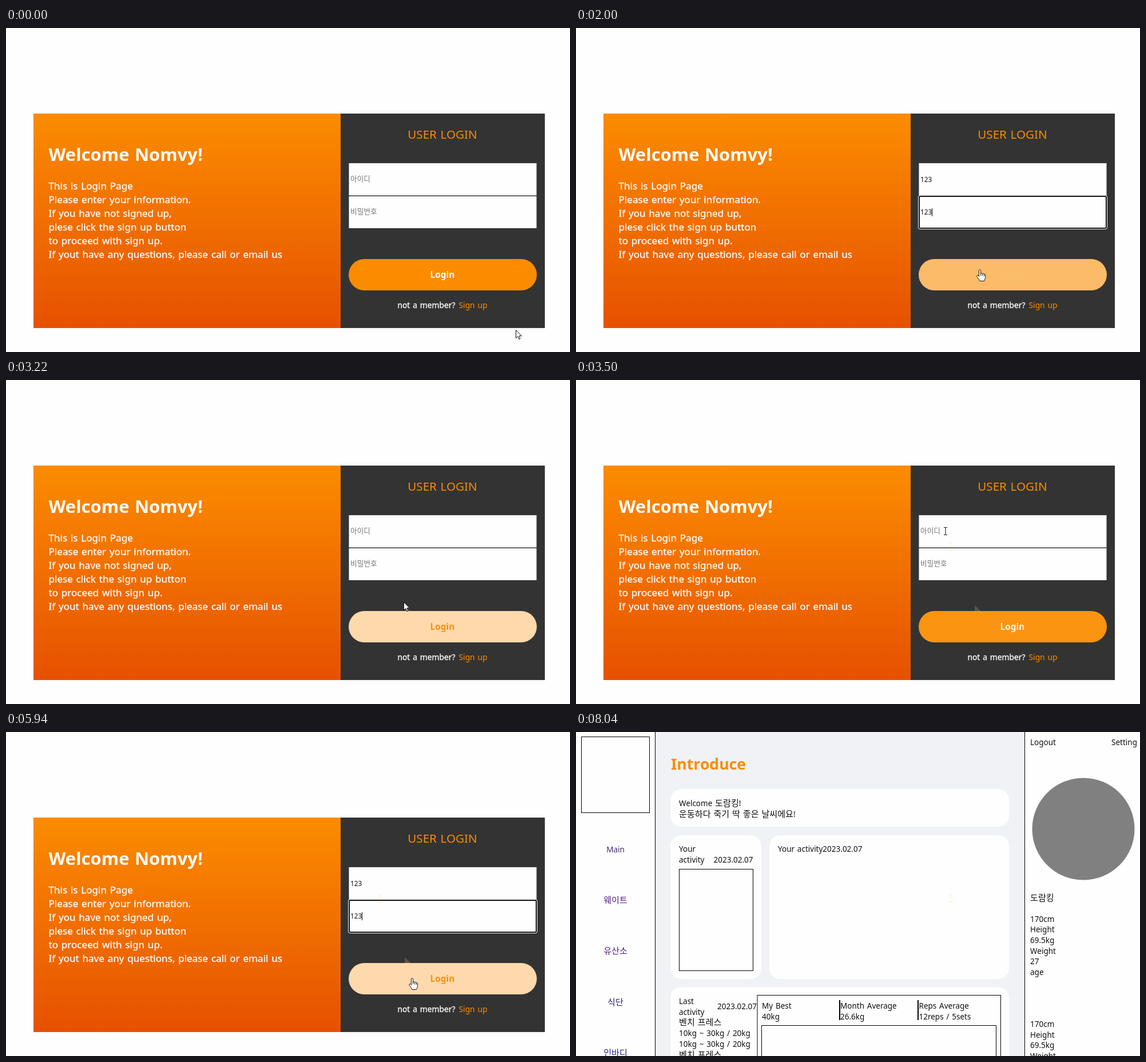
An HTML page that plays this animation: 986x568 px, repeating every 8.77 s.

```html
<!DOCTYPE html>
<html lang="ko">
<head>
<meta charset="utf-8">
<title>Login</title>
<style>
  html, body { margin: 0; width: 100%; height: 100%; overflow: hidden; background: #fefefe; }
  svg { display: block; width: 100vw; height: 100vh; }
  text { font-family: "Noto Sans", "Open Sans", "Noto Sans CJK KR", sans-serif; word-spacing: 1.3px; white-space: pre; }
  .ko { font-family: "Noto Sans CJK KR", "Noto Sans CJK", sans-serif; font-size: 1.12em; }
  .box { fill: none; stroke: #000; }
</style>
</head>
<body>
<svg id="stage" viewBox="0 0 986 568">
  <defs>
    <linearGradient id="warm" x1="0" y1="0" x2="0" y2="1">
      <stop offset="0" stop-color="#fb8c00"/>
      <stop offset="1" stop-color="#e65100"/>
    </linearGradient>
  </defs>
  <rect width="986" height="568" fill="#fefefe"/>

  <g id="login">
    <rect x="48" y="150" width="537" height="376" fill="url(#warm)"/>
    <rect x="585" y="150" width="357" height="376" fill="#333"/>
    <rect x="599.5" y="237" width="328" height="56.5" fill="#fefefe"/>
    <rect x="599.5" y="295" width="328" height="56" fill="#fefefe"/>
    <g id="ring">
      <rect x="598.5" y="0.5" width="330" height="59" rx="3" fill="#fefefe" stroke="#fefefe"/>
      <rect x="600" y="2" width="327" height="56" rx="2" fill="none" stroke="#101010" stroke-width="2"/>
    </g>
    <path id="trail" d="M697 395V405H708Z" fill="#5e513e"/>
    <rect id="button" x="599" y="405" width="329" height="55" rx="27.5"/>
  </g>

  <g id="home">
    <rect x="139" width="645" height="568" fill="#f0f2f5"/>
    <path class="box" d="M138.5 0V568M784.5 0V568"/>
    <rect class="box" x="9.5" y="8.5" width="119" height="133"/>
    <g fill="#fefefe">
      <rect x="165" y="100" width="592" height="66" rx="19"/>
      <rect x="165" y="181" width="159" height="252" rx="19"/>
      <rect x="338" y="181" width="419" height="252" rx="19"/>
      <rect x="165" y="447" width="592" height="160" rx="19"/>
    </g>
    <rect class="box" x="180.5" y="240.5" width="129" height="178"/>
    <rect class="box" x="317" y="461.5" width="425.5" height="140"/>
    <rect class="box" x="324.5" y="514.5" width="410" height="90"/>
    <path class="box" stroke-width="2" d="M461 470V505M598 470V505"/>
    <circle cx="887" cy="170" r="89.5" fill="#808080"/>
  </g>

  <path id="ghost" d="M651.5 285H658.5M655 285V298M651.5 298H658.5" fill="none" stroke="#f90" stroke-opacity=".2"/>
  <rect id="caret" width="1" height="14"/>

  <g id="arrow" fill="#fff" stroke="#111">
    <path d="M.5 .5V14.5L3.7 11.6L5.9 16.6L8 15.7L5.9 10.8H10.4Z"/>
  </g>
  <g id="beam" fill="none" stroke="#111">
    <path d="M-3-6.5H-1L0-6L1-6.5H3M0-6V6M-3 6.5H-1L0 6L1 6.5H3"/>
  </g>
  <g id="hand" fill="#fff" stroke="#111" stroke-linejoin="round">
    <path d="M-1.5 12.5V1.5Q0-.8 1.5 1.5V7.5Q3 5.8 4.3 7.8Q6 6.4 7.2 8.6Q9.2 7.8 9.5 10V14.5Q9 18 7.6 20.5H0Q-1 18-4.6 13.6Q-5.8 11.2-4.3 10.4Q-3 10.2-1.5 12.5Z"/>
    <path d="M1.5 7.5V11M4.3 8V11.5M7.2 9V12" fill="none"/>
  </g>
</svg>
<script>
const LOOP = 8770, HOME = 6960, TICK = 69;
const $ = id => document.getElementById(id);
const NS = "http://www.w3.org/2000/svg";

function fill(el, str) {
  el.textContent = "";
  for (const part of str.split(/([가-힣]+)/)) {
    if (!part) continue;
    const span = document.createElementNS(NS, "tspan");
    if (/[가-힣]/.test(part)) span.setAttribute("class", "ko");
    span.textContent = part;
    el.append(span);
  }
}

function label(parent, str, x, y, size, color, extra = {}) {
  const el = document.createElementNS(NS, "text");
  const attrs = { x, y, "font-size": size, fill: color, ...extra };
  for (const k in attrs) el.setAttribute(k, attrs[k]);
  fill(el, str);
  parent.append(el);
  return el;
}

const orange = "#fb8c00", white = "#fefefe";
const mid = { "text-anchor": "middle" };
const bold = { "font-weight": 700 };
const firm = { stroke: white, "stroke-width": 0.3 };

// Login page
const login = $("login"), home = $("home");
label(login, "Welcome Nomvy!", 74.5, 232.5, 31, white, bold);
["This is Login Page", "Please enter your information.", "If you have not signed up,",
 "plese click the sign up button", "to proceed with sign up.",
 "If yout have any questions, please call or email us"]
  .forEach((s, i) => label(login, s, 74.5, 282.5 + 24 * i, 17.1, white, firm));
label(login, "USER LOGIN", 763, 194, 20.6, orange, mid);
label(login, "not a member?", 684.5, 491, 13.8, white, firm);
label(login, "Sign up", 791.5, 491, 13.8, orange);
const action = label(login, "Login", 763, 438, 15.4, white, { ...mid, ...bold });
const fields = [["아이디", 269.5], ["비밀번호", 326.5]].map(([hint, y]) => ({
  hint: label(login, hint, 602, y - 0.5, 11.3, "#757575"),
  value: label(login, "", 602, y, 11.8, "#111")
}));

// Home page
const put = (s, x, y, extra, color = "#111") => label(home, s, x, y, 13.5, color, extra);
const column = (x, rows) => rows.forEach(([s, y]) => put(s, x, y));
label(home, "Introduce", 166, 66, 26.6, orange, bold);
[["Main", "#3d2b6b"], ["웨이트", "#551a8b"], ["유산소", "#551a8b"], ["식단", "#2a207c"], ["인바디", "#2a207c"]]
  .forEach(([s, c], i) => put(s, 69, 211 + 89.2 * i, mid, c));
column(180, [["Welcome 도람킹!", 129.5], ["운동하다 죽기 딱 좋은 날씨에요!", 148.5],
  ["Your", 210], ["activity", 229], ["Last", 476.5], ["activity", 495.5], ["벤치 프레스", 514],
  ["10kg ~ 30kg / 20kg", 533], ["10kg ~ 30kg / 20kg", 552], ["벤치 프레스", 570.5]]);
put("2023.02.07", 240.5, 229);
put("2023.02.07", 247, 485.5);
put("Your activity2023.02.07", 353, 210);
[["My Best", "40kg", 325], ["Month Average", "26.6kg", 462], ["Reps Average", "12reps / 5sets", 599.5]]
  .forEach(([a, b, x]) => column(x, [[a, 485], [b, 504]]));
column(794, [["Logout", 23], ["도람킹", 295.5]]);
put("Setting", 981, 23, { "text-anchor": "end" });
const stats = ["170cm", "Height", "69.5kg", "Weight", "27", "age"];
for (const top of [332.5, 517])
  column(794, stats.map((s, i) => [s, top + 18.7 * i]));

// [time, focused field, id, password]
const states = [
  [0, 0, "", ""], [480, 1, "", ""], [890, 1, "1", ""], [960, 1, "12", ""], [1030, 1, "123", ""],
  [1310, 2, "123", ""], [1440, 2, "123", "1"], [1510, 2, "123", "12"], [1580, 2, "123", "123"],
  [2410, 0, "123", "123"], [2750, 0, "", ""], [3640, 1, "", ""], [4700, 1, "1", ""],
  [4770, 1, "12", ""], [4840, 1, "123", ""], [5110, 2, "123", ""], [5310, 2, "123", "1"],
  [5450, 2, "123", "12"], [5590, 2, "123", "123"], [6490, 0, "123", "123"]
];

// Pointer path: [time, x, y]
const path = [
  [0, 891, 529], [60, 891, 529], [480, 680, 284], [550, 664, 271], [680, 664, 271], [690, 677, 277],
  [1100, 677, 277], [1310, 660, 328], [1580, 660, 328], [1930, 706, 423], [2990, 706, 423],
  [3170, 697, 395], [3240, 655, 291], [3380, 646, 265], [4770, 646, 265], [4960, 630, 332],
  [5560, 630, 332], [5750, 710, 431], [7620, 710, 431], [7680, 766, 434], [7970, 905, 545]
];

function pointer(t) {
  const i = path.findIndex(p => p[0] > t);
  if (i < 0) return path[path.length - 1].slice(1);
  const [t0, x0, y0] = path[i - 1], [t1, x1, y1] = path[i];
  const k = (t - t0) / (t1 - t0);
  return [x0 + (x1 - x0) * k, y0 + (y1 - y0) * k];
}

function ease(u) {
  const v = Math.pow(Math.min(1, Math.max(0, u)), 0.65);
  return v * v * (3 - 2 * v);
}

function hover(t) {
  if (t < 2750) return ease((t - 1860) / 500);
  if (t < 3120) return ease((t - 2750) / 500);
  if (t < 5700) return 0.95 * (1 - ease((t - 3120) / 500));
  return ease((t - 5700) / 500);
}

// Blend from orange (0) to white (1)
const tint = k => `rgb(${Math.round(251 + 3 * k)},${Math.round(140 + 114 * k)},${Math.round(254 * k)})`;
const show = (el, on) => el.setAttribute("visibility", on ? "visible" : "hidden");

function drawLogin(t) {
  const [since, focus, ...values] = states.filter(s => s[0] <= t).pop();
  fields.forEach((f, i) => {
    f.hint.style.display = values[i] ? "none" : "";
    f.value.textContent = values[i];
  });
  show($("ring"), focus);
  $("ring").setAttribute("transform", `translate(0 ${focus === 2 ? 293 : 235})`);
  show($("caret"), focus && t - since < 600);
  if (focus) {
    $("caret").setAttribute("x", 602 + Math.round(6.75 * values[focus - 1].length));
    $("caret").setAttribute("y", focus === 2 ? 316 : 258);
  }
  const k = hover(t);
  $("button").setAttribute("fill", tint(k));
  action.setAttribute("fill", tint(1 - Math.min(1, 1.4 * k)));
  show($("trail"), t >= 3170);
}

function drawPointer(t) {
  const [x, y] = pointer(Math.floor((t + 10) / TICK) * TICK);
  const inside = t < HOME && x > 599 && x < 928;
  const kind = inside && y > 236 && y < 351 ? "beam" : inside && y > 405 && y < 460 ? "hand" : "arrow";
  const visible = t < HOME || (t >= 7690 && t < 8040);
  for (const id of ["arrow", "beam", "hand"]) show($(id), visible && id === kind);
  $(kind).setAttribute("transform", `translate(${Math.round(x)} ${Math.round(y)})`);
}

function draw(t) {
  const atHome = t >= HOME;
  login.style.display = atHome ? "none" : "";
  home.style.display = atHome ? "" : "none";
  show($("ghost"), t >= 3240);
  if (atHome) show($("caret"), false);
  else drawLogin(t);
  drawPointer(t);
}

const start = performance.now();
function loop() {
  draw((performance.now() - start) % LOOP);
  requestAnimationFrame(loop);
}
loop();
</script>
</body>
</html>
```
